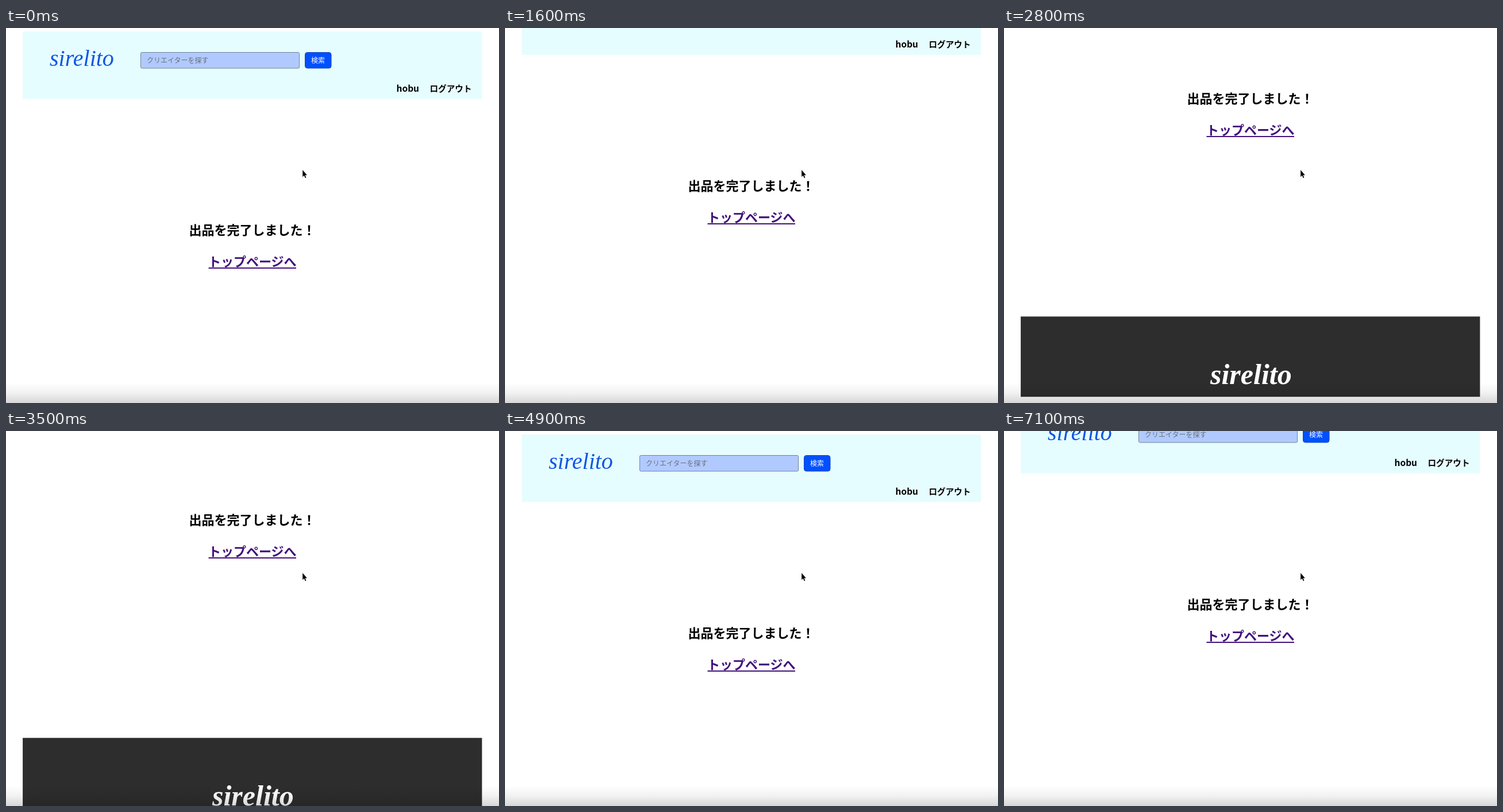
These frames come from a looping animation (858x653 px, 7.2 s). An HTML page:

```html
<!DOCTYPE html>
<html lang="ja">
<head>
<meta charset="utf-8">
<title>出品完了</title>
<style>
  html, body { margin: 0; width: 100%; height: 100%; overflow: hidden; background: #fff; }
  svg { display: block; width: 858px; height: 653px; }
  text { font-family: "Noto Sans CJK JP", "Noto Sans CJK", sans-serif; }
  .bold { font-weight: 700; }
  .logo { font-family: "Liberation Serif", serif; font-style: italic; }
</style>
</head>
<body>
<svg viewBox="0 0 858 653">
  <defs>
    <linearGradient id="shade" x1="0" y1="0" x2="0" y2="1">
      <stop offset="0" stop-opacity="0"/>
      <stop offset=".5" stop-opacity=".05"/>
      <stop offset="1" stop-opacity=".16"/>
    </linearGradient>
  </defs>
  <g id="page">
    <rect x="29.1" y="6" width="799.3" height="117.8" fill="#e6fdff"/>
    <text class="logo" x="76" y="66" font-size="40" fill="#0f55e6">sirelito</text>
    <rect x="234.5" y="42.5" width="276" height="27.5" rx="2" fill="#b0caff" stroke="#71809f"/>
    <text x="245" y="60.5" font-size="12" fill="#6b7079">クリエイターを探す</text>
    <rect x="520.5" y="42.5" width="45.5" height="27.5" rx="4" fill="#0050ff" stroke="#1c46b8"/>
    <text x="531" y="60.8" font-size="12" font-weight="500" fill="#fff">検索</text>
    <g class="bold" font-size="14.6">
      <text x="719" y="110.7" text-anchor="end" font-size="15.5">hobu</text>
      <text x="737.5" y="110.7">ログアウト</text>
    </g>
    <g class="bold" font-size="22">
      <text x="318.5" y="360">出品を完了しました！</text>
      <text x="352" y="415" fill="#43127c">トップページへ</text>
    </g>
    <rect x="352.5" y="417" width="152.5" height="2" fill="#43127c"/>
    <rect x="29.1" y="731.4" width="799.3" height="139.8" fill="#2d2d2d"/>
    <text class="logo bold" x="359" y="849" font-size="50" fill="#fff">sirelito</text>
  </g>
  <rect y="617" width="858" height="36" fill="url(#shade)"/>
  <path d="M516.2 247.2V259.2L518.8 256.8L520.8 261.2L522.4 260.5L520.5 256.2H523.9Z"
        stroke="#fff" stroke-width="1.4" stroke-linejoin="round" paint-order="stroke"/>
</svg>
<script>
  const LOOP = 7200, STEP = 100;
  const page = document.getElementById("page");

  // [time in ms, scroll offset in px]
  const keys = [
    [0, 0], [800, 0], [1600, 77], [2200, 220], [2400, 224], [2800, 229], [3200, 225],
    [3500, 197], [4000, 140], [4400, 99], [4800, 0], [6200, 0], [6400, 9], [7100, 50], [LOOP, 54]
  ];

  const slope = i => (keys[i + 1][1] - keys[i][1]) / (keys[i + 1][0] - keys[i][0]);

  // Harmonic mean of neighbouring slopes keeps the curve free of overshoot.
  function tangent(i) {
    if (i === 0 || i === keys.length - 1) return 0;
    const a = slope(i - 1), b = slope(i);
    return a * b > 0 ? 2 * a * b / (a + b) : 0;
  }

  function scrollAt(t) {
    const i = keys.findIndex(k => k[0] > t) - 1;
    const [t0, y0] = keys[i], [t1, y1] = keys[i + 1];
    const d = t1 - t0, u = (t - t0) / d, v = 1 - u;
    return y0 * v * v * (1 + 2 * u) + y1 * u * u * (1 + 2 * v)
      + d * u * v * (v * tangent(i) - u * tangent(i + 1));
  }

  function draw() {
    const t = Math.floor(performance.now() % LOOP / STEP) * STEP;
    page.setAttribute("transform", `translate(0 ${-Math.round(scrollAt(t))})`);
    requestAnimationFrame(draw);
  }
  draw();
</script>
</body>
</html>
```
